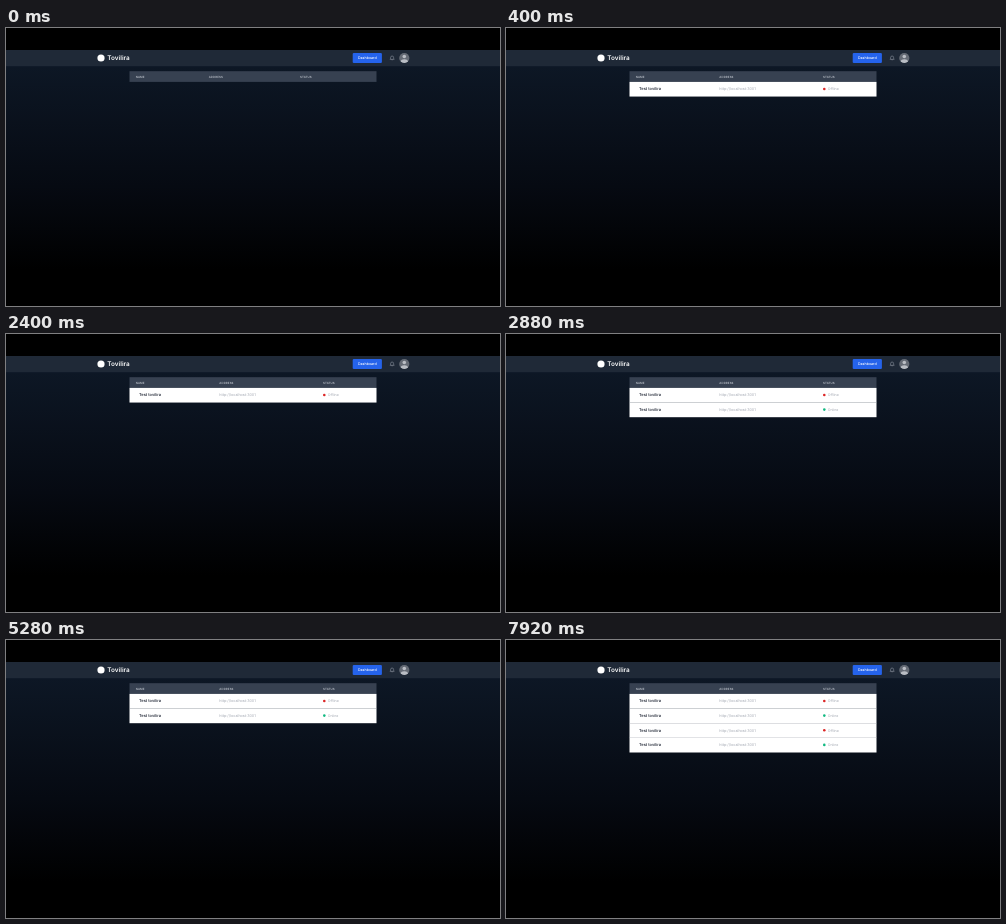
An HTML page that plays this animation: 494 px wide and 278 px high, repeating every 8000 ms.

```html
<!DOCTYPE html>
<html lang="en">
<head>
<meta charset="utf-8">
<title>Status dashboard</title>
<style>
  html, body { margin: 0; width: 100%; height: 100%; overflow: hidden; background: #000; }
  svg { display: block; width: 100vw; height: 100vh; }
  text { font-family: Inter, "Liberation Sans", sans-serif; text-rendering: geometricPrecision; }
  .brand { font-size: 6.4px; font-weight: 600; fill: #fff; }
  .button { font-size: 3.6px; font-weight: 500; fill: #fff; }
  .head { font-size: 2.9px; font-weight: 500; letter-spacing: .1px; fill: #c3c8d0; }
  .name { font-size: 4px; font-weight: 500; fill: #111827; }
  .address { font-size: 3.75px; fill: #a3a8b2; }
  .status { font-size: 3.55px; fill: #a3a8b2; }
</style>
</head>
<body>
<svg viewBox="0 0 494 278" xmlns="http://www.w3.org/2000/svg">
  <defs>
    <linearGradient id="page" x1="0" y1="0" x2="0" y2="1">
      <stop offset="0" stop-color="#0d1725"/>
      <stop offset=".5" stop-color="#060a12"/>
      <stop offset=".85" stop-color="#000"/>
    </linearGradient>
    <clipPath id="avatar"><circle cx="398.3" cy="30" r="5.1"/></clipPath>
  </defs>
  <rect width="494" height="278"/>
  <rect y="38" width="494" height="240" fill="url(#page)"/>

  <rect y="22" width="494" height="16.2" fill="#1f2937"/>
  <circle cx="95" cy="30" r="3.6" fill="#fff"/>
  <text class="brand" x="101.3" y="32.3">Tovilira</text>
  <rect x="346.7" y="25" width="29.2" height="10.1" rx="1.1" fill="#2563eb"/>
  <text class="button" x="361.3" y="31.3" text-anchor="middle">Dashboard</text>
  <path d="M384 31.3 q.6 -.5 .6 -1.7 a1.5 1.6 0 0 1 3 0 q0 1.2 .6 1.7 z M385.4 31.5 a.75 .75 0 0 0 1.4 0"
        fill="none" stroke="#9ca3af" stroke-width=".5"/>
  <g clip-path="url(#avatar)">
    <rect x="393" y="24" width="11" height="12" fill="#656b75"/>
    <circle cx="398.3" cy="28.5" r="1.8" fill="#b9bdc4"/>
    <ellipse cx="398.3" cy="34.2" rx="3.8" ry="2.9" fill="#b9bdc4"/>
  </g>

  <rect x="123.5" y="43.2" width="247" height="10.7" fill="#374151"/>
  <text class="head" x="129.7" y="49.5">NAME</text>
  <text class="head" id="addressHead" y="49.5">ADDRESS</text>
  <text class="head" id="statusHead" y="49.5">STATUS</text>
  <g id="rows"></g>
</svg>
<script>
  const LOOP = 8000;
  const ROW_HEIGHT = 14.65;
  const rowTimes = [400, 2880, 5360, 7920];
  const byId = id => document.getElementById(id);

  function rowMarkup(index) {
    const online = index % 2 === 1;
    const top = 53.9 + index * ROW_HEIGHT;
    const middle = top + 7.05;
    const divider = index
      ? `<rect x="123.5" y="${top - .15}" width="247" height=".3" fill="#e5e7eb"/>` : '';
    return `<g>
      <rect x="123.5" y="${top}" width="247" height="${ROW_HEIGHT}" fill="#fff"/>${divider}
      <text class="name" x="133" y="${middle + 1.3}">Test tovilira</text>
      <text class="address" x="213.3" y="${middle + 1.3}">http://localhost:3001</text>
      <circle cx="318.3" cy="${middle}" r="1.3" fill="${online ? '#10b981' : '#dc2626'}"/>
      <text class="status" x="321.7" y="${middle + 1.25}">${online ? 'Online' : 'Offline'}</text>
    </g>`;
  }

  byId('rows').innerHTML = rowTimes.map((_, index) => rowMarkup(index)).join('');
  const rows = [...byId('rows').children];

  function draw(time) {
    rows.forEach((row, index) => {
      row.setAttribute('visibility', time >= rowTimes[index] ? 'visible' : 'hidden');
    });
    // Columns widen once the table has content.
    const filled = time >= rowTimes[0];
    byId('addressHead').setAttribute('x', filled ? 213.3 : 202.7);
    byId('statusHead').setAttribute('x', filled ? 317 : 294);
  }

  const start = performance.now();
  function tick() {
    draw((performance.now() - start) % LOOP);
    requestAnimationFrame(tick);
  }
  tick();
</script>
</body>
</html>
```
